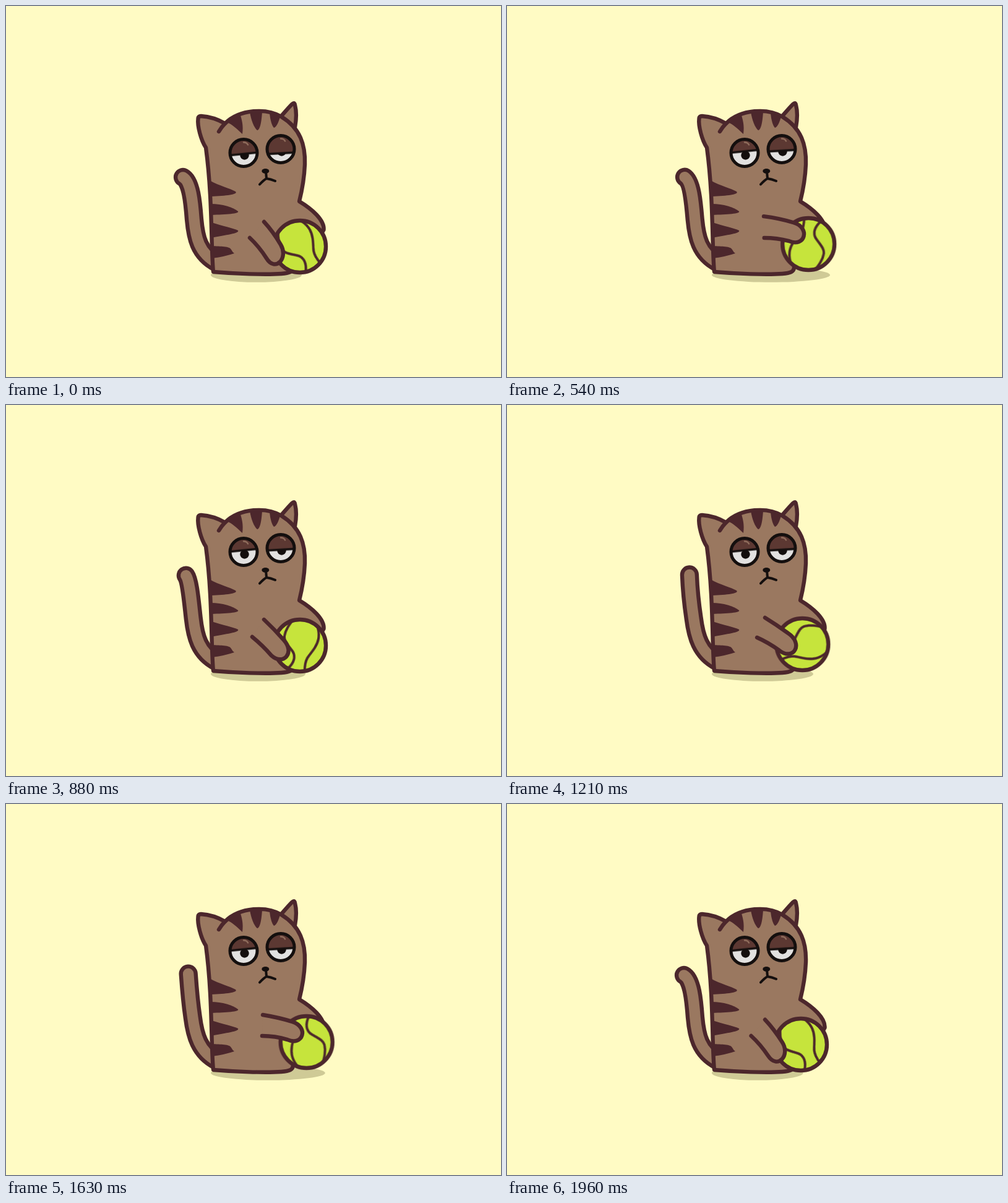
These frames come from a looping animation (800x600 px, 2 s). An HTML page without scripts:

```html
<!DOCTYPE html>
<html lang="en">
<head>
<meta charset="utf-8">
<title>Sleepy cat with a ball</title>
<style>
  :root {
    --line: #4c272c;
    --fur: #9a7860;
    --ink: #140f0e;
    --sine: cubic-bezier(.37, 0, .63, 1);
  }
  html, body { margin: 0; height: 100%; overflow: hidden; background: #fffbc4; }
  svg { display: block; width: 100vw; height: 100vh; }

  .line { fill: none; stroke: var(--line); stroke-width: 6.4; stroke-linecap: round; stroke-linejoin: round; }
  .fur { fill: var(--fur); }
  .stripe { fill: var(--line); }
  .ink { fill: none; stroke: var(--ink); stroke-width: 4; stroke-linecap: round; stroke-linejoin: round; }

  .shadow { fill: #cfca96; transform-origin: 331px 435px; animation: stretch 1s var(--sine) infinite; }
  @keyframes stretch { 50% { transform: scaleX(1.305); } }

  .tail { fill: none; stroke-linecap: round; animation: wag 2s var(--sine) infinite; }
  .tail.rim { stroke: var(--line); stroke-width: 30.3px; }
  .tail.core { stroke: var(--fur); stroke-width: 17.5px; }
  @keyframes wag {
    0%, 25%, 49%, 98%, 100% { d: path("M286 277 C299 284 302 318 304 345 C306.5 373 311 400 342 416"); }
    12.5%, 36.5%, 69% { d: path("M300.3 273 C293 285 295 318 300.3 345 C304.5 373 312.5 401 342 416"); }
  }

  .push { animation: push 1s linear infinite; }
  @keyframes push {
    0% { transform: none; animation-timing-function: ease-in; }
    21% { transform: translate(2.3px, -2px); }
    29% { transform: translate(5px, -4px); animation-timing-function: ease-out; }
    50% { transform: translate(12.5px, -4px); animation-timing-function: ease-in; }
    63% { transform: translate(10.7px, -4px); }
    88%, 100% { transform: none; }
  }

  .spin { animation: spin 2s var(--sine) infinite; }
  @keyframes spin {
    0%, 100% { transform: rotate(-36deg); }
    25%, 75% { transform: rotate(188deg); animation-timing-function: cubic-bezier(.45, 0, .7, 1); }
    50% { transform: rotate(-36deg); animation-timing-function: cubic-bezier(.2, 0, .65, 1); }
  }

  .arm { fill: var(--fur); animation: reach 1s linear infinite; }
  @keyframes reach {
    0%, 100% {
      d: path("M417 349 Q431 364 444 386 C457 408 435 431 421 408 Q409 389 394 375");
      animation-timing-function: ease-in;
    }
    21% { d: path("M417 344 Q435 355 454 369 C480 386 463 415 440 397 Q422 384 404 376"); }
    29% {
      d: path("M416 343 Q437 351 459 363 C485 378 473 404 448 389 Q429 381 409 376");
      animation-timing-function: ease-out;
    }
    50% {
      d: path("M415 340 Q440 343 463 350 C491 358 482 391 456 380 Q436 375 416 375");
      animation-timing-function: ease-in;
    }
    63% { d: path("M415 341 Q440 345 463 352 C490 361 480 392 455 381 Q435 375 414 375"); }
    88% {
      d: path("M417 347 Q433 362 449 380 C468 401 448 422 429 405 Q415 389 398 375");
      animation-timing-function: ease-out;
    }
  }

  .lid { fill: #5c3832; stroke: var(--ink); stroke-width: 3.5; animation: blink 2s linear infinite; }
  @keyframes blink {
    0%, 100% { transform: translateY(4px); }
    5%, 7% { transform: translateY(21px); }
    13%, 98% { transform: none; }
  }
</style>
</head>
<body>
<svg viewBox="0 0 800 600" xmlns="http://www.w3.org/2000/svg">
  <defs>
    <clipPath id="socket"><circle r="22"/></clipPath>
    <clipPath id="round"><circle r="42"/></clipPath>
    <g id="eyeball">
      <circle r="22" fill="#e2e1e0"/>
      <circle cx="1.5" cy="4" r="7.2" fill="#140f0e"/>
    </g>
    <g id="socketRim">
      <path d="M0 -17 Q5 -17 7 -13" fill="none" stroke="#8f6d5c" stroke-width="2.5" stroke-linecap="round"/>
      <circle r="22" fill="none" stroke="#140f0e" stroke-width="5"/>
    </g>
  </defs>

  <ellipse class="shadow" cx="404.5" cy="435" rx="73.5" ry="11.8"/>

  <path class="tail rim" d="M286 277 C299 284 302 318 304 345 C306.5 373 311 400 342 416"/>
  <path class="tail core" d="M286 277 C299 284 302 318 304 345 C306.5 373 311 400 342 416"/>

  <!-- body and head -->
  <path class="line fur" d="M444 179 C451 171 457 164 462 159 Q466 155 467 160 C470 172 469 185 467 196"/>
  <path class="line fur" d="M335 430 C331 390 334 310 323 229 C315 217 309 194 310.5 182 Q311 178 315 178 C330 179 342 183 354 190
    C378 166 422 165 445 179 C476 198 484 225 483 256 C482 280 478 300 474 316
    C494 328 515 346 513.5 362 Q508 374 470 396 L464 422 C464 430 458 432 445 433 C420 435 370 433 335 430 Z"/>
  <path class="line" d="M344 203 Q348 196 354 190"/>
  <g class="stripe">
    <path d="M356 188 C366 191 373 199 382 207 C384 193 381 183 378 174 Q366 179 356 188Z"/>
    <path d="M394 171 C396 185 401 197 406 201 C411 200 413 186 414 171Z"/>
    <path d="M426 173 C427 185 430 194 433 197 C437 196 441 187 443 179Z"/>
    <path d="M329 282 C345 291 362 295 371 300 C376 305 355 307 332 308Z"/>
    <path d="M331 320 C350 320 366 325 375 332 C378 336 355 337 332 338Z"/>
    <path d="M332 350 C350 356 367 359 375 363 C378 368 355 370 332 375Z"/>
    <path d="M332 388 C348 389 361 388 364 394 Q366 398 369 400 Q355 405 333 408Z"/>
  </g>

  <!-- face -->
  <g transform="translate(384 237.5)">
    <use href="#eyeball"/>
    <g clip-path="url(#socket)"><path class="lid" d="M-30 .5 L30 -5.5 V-60 H-30Z"/></g>
    <use href="#socketRim"/>
  </g>
  <g transform="translate(444 231.5)">
    <use href="#eyeball"/>
    <g clip-path="url(#socket)"><path class="lid" d="M-30 4.2 L30 .8 V-60 H-30Z"/></g>
    <use href="#socketRim"/>
  </g>
  <ellipse cx="419.3" cy="267" rx="6" ry="4" fill="#140f0e"/>
  <path class="ink" d="M420 268 L421 279 M410 288.5 Q417 281 421 279 Q428 280 435 283"/>

  <!-- ball -->
  <g transform="translate(475 389)">
    <g class="push">
      <circle r="42" fill="#c6e43c"/>
      <g clip-path="url(#round)">
        <g class="spin">
          <path class="line" style="stroke-width:4" d="M-17 39 C-7 29 -4 17 -13 8 C-20 0 -27 -6 -26 -14 C-25 -24 -20 -32 -14 -41
            M11 40 C10 30 11 22 16 15 C22 6 28 -3 29 -13 C30 -22 28 -28 25 -35"/>
        </g>
      </g>
      <circle class="line" r="42"/>
    </g>
  </g>

  <path class="line arm" d="M417 349 Q431 364 444 386 C457 408 435 431 421 408 Q409 389 394 375"/>
</svg>
</body>
</html>
```
